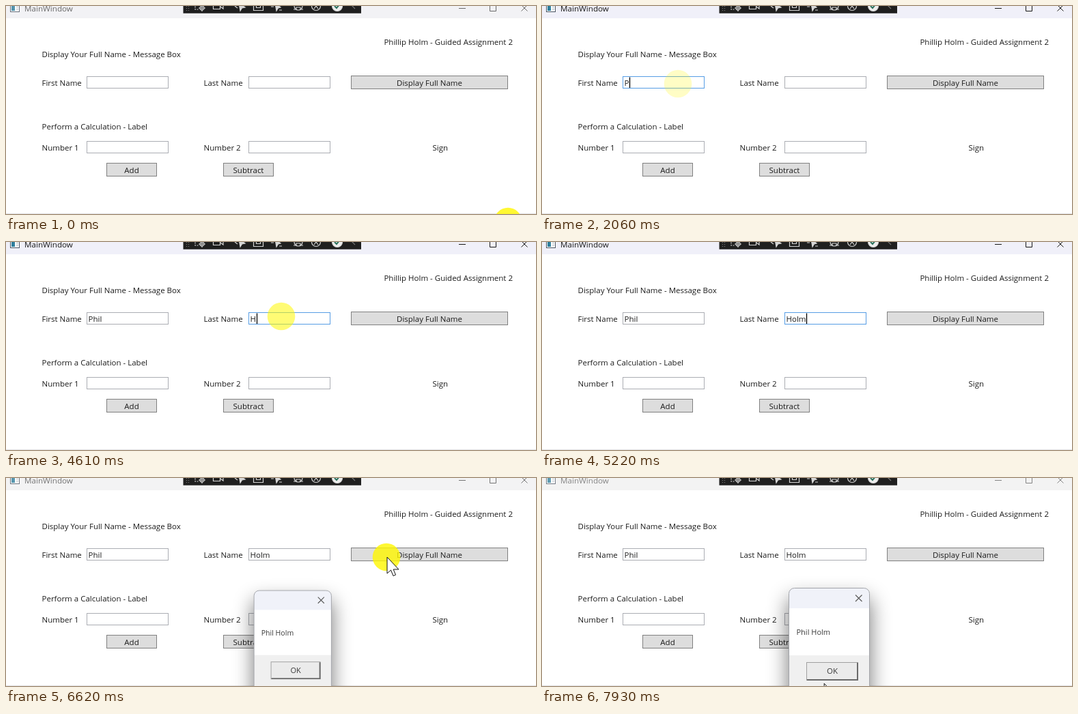
Write an HTML page that moves like this. It is 776x305 px and loops after 8 s.

```html
<!DOCTYPE html>
<html lang="en">
<head>
<meta charset="utf-8">
<title>MainWindow</title>
<style>
  html, body { margin: 0; width: 100%; height: 100%; overflow: hidden; background: #fff; }
  svg { display: block; width: 100vw; height: 100vh; font: 11.5px "Open Sans", "Noto Sans", sans-serif; }
  text { fill: #1c1c1c; white-space: pre; }
  .mid { text-anchor: middle; }
  .end { text-anchor: end; }
  .field { fill: #fff; stroke: #abadb3; }
  .field.hover { stroke: #7eb4ea; }
  .field.focus { stroke: #569de5; }
  .button { fill: #ddd; stroke: #808080; }
  .button.hover { fill: #bee6fd; stroke: #3c7fb1; }
  .button.pressed { fill: #c4e5f6; stroke: #2c628b; }
  .line { fill: none; stroke: currentColor; }
  .tools { fill: none; stroke: #d6d6d6; stroke-width: 1.2; }
  #title { fill: currentColor; font-size: 11.65px; }
  #dialog { transform-origin: 402px 250px; }
  #dialog text { fill: #3a3a3a; }
</style>
</head>
<body>
<svg viewBox="0 0 776 305">
  <defs>
    <filter id="blur" x="-60%" y="-50%" width="220%" height="200%"><feGaussianBlur stdDeviation="15"/></filter>
    <clipPath id="dialogShape"><rect x="361.5" y="161.5" width="118" height="170" rx="8"/></clipPath>
    <clipPath id="barShape"><rect x="260" width="260" height="10"/></clipPath>
  </defs>

  <rect width="776" height="305" fill="#fff"/>
  <rect width="776" height="18" fill="#f3f3f3"/>
  <rect id="activeBar" width="776" height="18" fill="#f0f0f9"/>
  <path d="M0 304.5H776" stroke="#e3e3e6"/>

  <g id="chrome">
    <g id="icon">
      <rect x="6.5" y="-4.5" width="13" height="13" fill="#fff" stroke="#4b5563"/>
      <rect x="8" y="-2" width="5" height="9" fill="#2f7f9d"/>
      <path d="M15 1.5H18M15 4.5H18" stroke="#a8b4bd"/>
    </g>
    <text id="title" x="27" y="8">MainWindow</text>
    <path class="line" d="M663 3.5H673M708.5 -2V7.5H717.5V-2M754.5 -1.5L763.5 7.5M763.5 -1.5L754.5 7.5"/>
  </g>

  <rect x="259.5" width="260.5" height="10.7" fill="#1f1f1f"/>
  <g class="tools" clip-path="url(#barShape)">
    <path d="M264.5 0V9M267.5 0V9" stroke="#777" stroke-dasharray="1 2"/>
    <path d="M277 -3V5H283" stroke-dasharray="2 1.5"/>
    <circle cx="287" cy="3" r="3"/><path d="M287 -2V8M282 3H292"/>
    <path d="M303.5 -3V4.5H313.5V-3M314 1L318 4V-2"/>
    <path d="M341 -4L343 7L345.5 3L350 2Z" fill="#d6d6d6"/><path d="M335 0L339 3"/>
    <path d="M362.5 -4V6.5H376.5V-4M366.5 -2V2.5H372.5V-2"/>
    <path d="M394 -4L396 7L398.5 3L402 2Z" fill="#d6d6d6"/><path d="M388 1H392M400 6H404"/>
    <circle cx="428" cy="0" r="6"/><path d="M421 5H425V2H431V5H435"/>
    <circle cx="454" cy="0" r="6.5"/><path d="M451 4L454 0L457 4M450 -1H458"/>
    <circle cx="485" cy="0" r="7.5" fill="#eee"/><path d="M481 0L484 3L489 -3" stroke="#28705c" stroke-width="2"/>
    <path d="M511 -4L507 0L511 4" stroke="#777"/>
  </g>

  <text class="end" x="742" y="56.5">Phillip Holm - Guided Assignment 2</text>
  <text x="52.5" y="74.5">Display Your Full Name - Message Box</text>
  <text x="52.5" y="117">First Name</text>
  <text x="289.5" y="117">Last Name</text>
  <text x="52.5" y="180.5">Perform a Calculation - Label</text>
  <text x="52.5" y="212">Number 1</text>
  <text x="289.5" y="212">Number 2</text>
  <text x="624.5" y="212">Sign</text>

  <rect class="field" id="firstBox" x="118.5" y="103.5" width="119" height="17"/>
  <rect class="field" id="lastBox" x="355.5" y="103.5" width="119" height="17"/>
  <rect class="field" x="118.5" y="198.5" width="119" height="17"/>
  <rect class="field" x="355.5" y="198.5" width="119" height="17"/>
  <text id="firstText" x="120.5" y="117"></text>
  <text id="lastText" x="357.5" y="117"></text>
  <path id="caret" d="M0 104.5V120" stroke="#000" stroke-width="1.3"/>

  <rect class="button" id="showButton" x="505.5" y="102.5" width="229" height="19"/>
  <rect class="button" x="147.5" y="230.5" width="73" height="19"/>
  <rect class="button" x="318.5" y="230.5" width="73" height="19"/>
  <text class="mid" x="620" y="117">Display Full Name</text>
  <text class="mid" x="184" y="245">Add</text>
  <text class="mid" x="355" y="245">Subtract</text>

  <g id="dialog">
    <rect x="360" y="176" width="121" height="165" rx="8" filter="url(#blur)" opacity=".5"/>
    <g clip-path="url(#dialogShape)">
      <rect x="361" y="161" width="119" height="171" fill="#fff"/>
      <rect x="361" y="161" width="119" height="30" fill="#f0f2f9"/>
      <rect x="361" y="260" width="119" height="72" fill="#f0f0f0"/>
    </g>
    <rect x="361.5" y="161.5" width="118" height="170" rx="8" fill="none" stroke="#a3a5aa"/>
    <path d="M459 171.5L468.5 181M468.5 171.5L459 181" stroke="#5c5c5c" stroke-width="1.2"/>
    <text x="372.5" y="229.7" font-size="11">Phil Holm</text>
    <rect x="387.5" y="270.5" width="75" height="26" fill="#ebebeb" stroke="#a0a0a0"/>
    <path d="M388 296H462V271" fill="none" stroke="#6a6a6a" stroke-width="2"/>
    <text class="mid" x="425" y="287">OK</text>
  </g>

  <circle id="halo" r="20.3" fill="#fff700"/>
  <g id="pointer">
    <path id="arrow" d="M0 0V24L5.5 19L9 27.5L12.5 26L9.2 18H17Z" fill="#fff" stroke="#111"/>
    <path id="beam" d="M-3 -8.5H3M0 -8.5V8.5M-3 8.5H3" stroke="#222"/>
  </g>
</svg>

<script>
const LOOP = 8000, TICK = LOOP / 104;
const $ = id => document.getElementById(id);
const within = (t, a, b) => t >= a && t < b;
const show = (el, on) => el.style.display = on ? '' : 'none';

// Linear interpolation through rows of [time, ...values].
function track(rows, t) {
  if (t <= rows[0][0]) return rows[0].slice(1);
  const i = rows.findIndex(row => row[0] > t);
  if (i < 0) return rows[rows.length - 1].slice(1);
  const a = rows[i - 1], b = rows[i], k = (t - a[0]) / (b[0] - a[0]);
  return a.slice(1).map((v, n) => v + (b[n + 1] - v) * k);
}

const pointerPath = [
  [0, 735, 316], [500, 735, 316], [620, 700, 292], [770, 570, 236], [920, 390, 172],
  [1080, 240, 124], [1220, 199, 114], [3230, 199, 114], [3310, 225, 111], [3460, 330, 92],
  [3540, 385, 93], [3615, 407, 102], [3690, 404, 107], [3770, 403, 109], [5840, 403, 109],
  [5920, 520, 121], [6000, 549, 116], [6230, 558, 116], [6980, 558, 116], [7230, 558, 127],
  [7310, 558, 127], [7385, 552, 150], [7540, 510, 250], [7620, 488, 290], [7700, 470, 312],
  [7850, 420, 312], [7925, 413, 301]
];
const activity = [[0, .25], [154, 0], [1385, 0], [1615, 1], [6400, 1], [6615, .15], [6770, 0]];
const dialogIn = [[6460, 0, .88], [6615, 1, .96], [6770, 1, 1]];

const clicks = [
  { x: 735, y: 316, from: 0, fade: 500 },
  { x: 199, y: 114, from: 1440, fade: 1920 },
  { x: 403, y: 109, from: 3920, fade: 4545 },
  { x: 557, y: 116, from: 6380, fade: 6950 }
];
const typed = [
  { text: $('firstText'), box: $('firstBox'), word: 'Phil', keys: [1980, 2380, 2610, 2680],
    focus: [1440, 3920], caret: [[1440, 3290]] },
  { text: $('lastText'), box: $('lastBox'), word: 'Holm', keys: [4530, 4910, 5070, 5220],
    focus: [3920, 6380], caret: [[3920, 5770], [6150, 6380]] }
];
const controls = [...document.querySelectorAll('.field, .button')].map(el => ({
  el, x: +el.getAttribute('x'), y: +el.getAttribute('y'),
  w: +el.getAttribute('width'), h: +el.getAttribute('height')
}));

function drawPointer(t, q) {
  const [x, y] = track(pointerPath, q);
  const visible = !within(t, 1980, 3290) && !within(t, 4530, 5920);
  let overField = false;
  for (const c of controls) {
    const hover = visible && t < 6540 && within(x, c.x, c.x + c.w) && within(y, c.y, c.y + c.h);
    c.el.classList.toggle('hover', hover);
    if (hover && c.el.matches('.field')) overField = true;
  }
  $('pointer').setAttribute('transform', `translate(${x} ${y})`);
  show($('pointer'), visible);
  show($('arrow'), !overField);
  show($('beam'), overField);
}

function drawTyping(t) {
  let caretOn = false;
  for (const f of typed) {
    f.text.textContent = f.word.slice(0, f.keys.filter(k => t >= k).length);
    f.box.classList.toggle('focus', within(t, ...f.focus));
    if (f.caret.some(span => within(t, ...span))) {
      caretOn = true;
      const x = +f.text.getAttribute('x') + f.text.getComputedTextLength() + .5;
      $('caret').setAttribute('transform', `translate(${Math.round(x) + .5} 0)`);
    }
  }
  show($('caret'), caretOn);
}

function drawHalo(t, q) {
  const click = clicks.filter(c => t >= c.from).pop();
  const left = Math.max(0, Math.min(1, 1 - (q - click.fade) / 220));
  $('halo').setAttribute('cx', click.x);
  $('halo').setAttribute('cy', click.y);
  $('halo').setAttribute('opacity', .8 * left);
}

function draw(t) {
  const q = Math.floor((t + 22) / TICK) * TICK;
  const [active] = track(activity, q);
  const grey = Math.round(132 - 108 * active);
  $('chrome').style.color = `rgb(${grey},${grey},${grey})`;
  $('activeBar').setAttribute('opacity', active);
  $('icon').setAttribute('opacity', .75 + .25 * active);

  drawPointer(t, q);
  drawTyping(t);
  drawHalo(t, q);
  $('showButton').classList.toggle('pressed', within(t, 6380, 6460));

  const [opacity, scale] = track(dialogIn, q);
  $('dialog').style.opacity = opacity;
  $('dialog').style.transform = `scale(${scale})`;
}

function frame() {
  draw(performance.now() % LOOP);
  requestAnimationFrame(frame);
}
frame();
</script>
</body>
</html>
```
